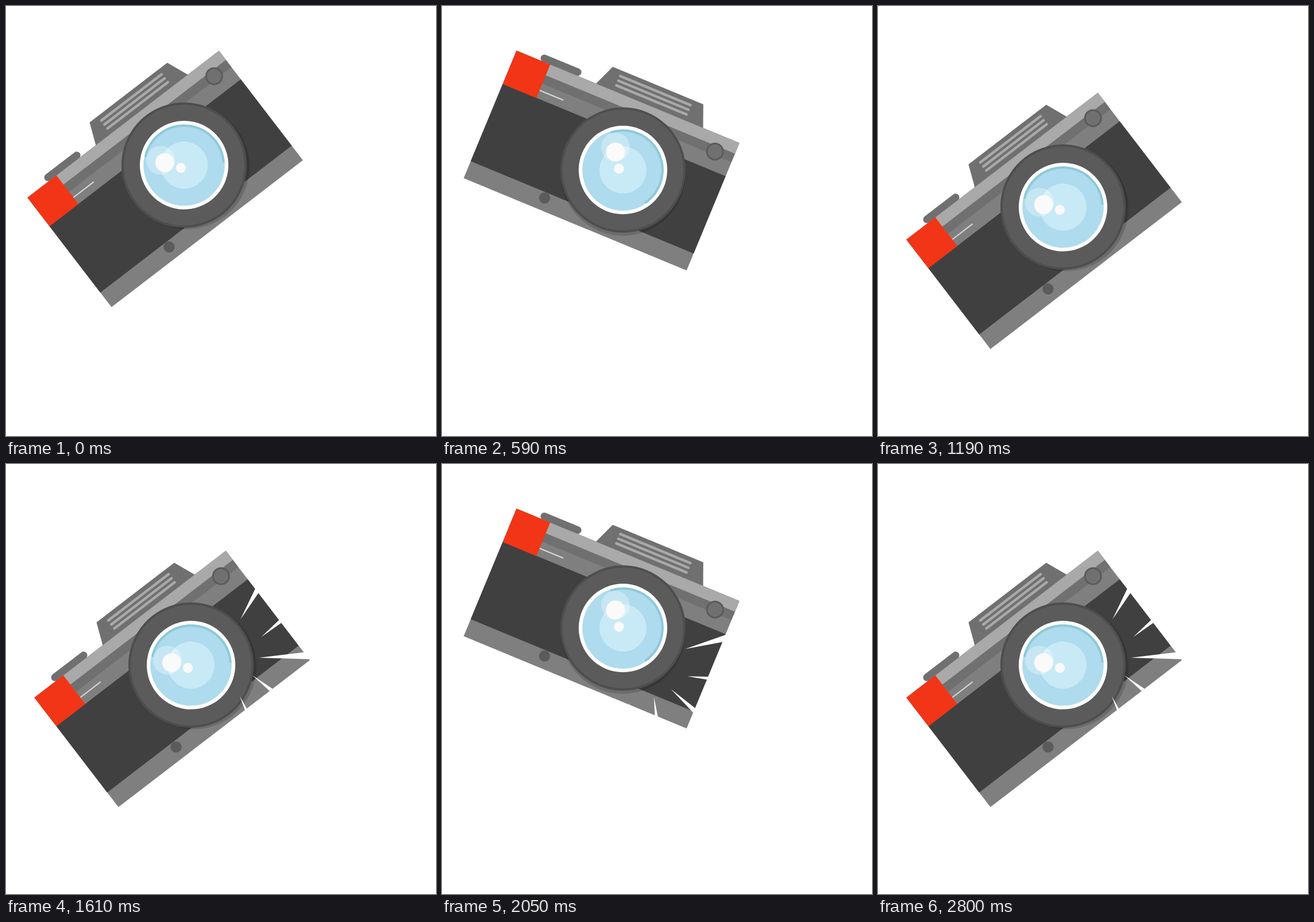
Animation, 748 px wide and 748 px high, one loop 2970 ms. Source, as an HTML page:

```html
<!DOCTYPE html>
<html lang="en">
<head>
<meta charset="utf-8">
<title>Cracking camera</title>
<style>
html, body { margin: 0; width: 100%; height: 100%; overflow: hidden; background: #fff; }
svg { display: block; width: 100%; height: 100%; }
</style>
</head>
<body>
<svg viewBox="0 0 748 748">
  <g id="stage">
    <g id="camera">
      <g stroke-linecap="round" fill="none">
        <path d="M49 -6.3H112" stroke="#707070" stroke-width="13"/>
        <path d="M148.7 1L164.7 -38.2H335.2L351.2 1Z" fill="#707070"/>
        <path d="M183 -28.3H315M183 -19.5H315M183 -10.8H315" stroke="#a9a9a9" stroke-width="4.5"/>
      </g>
      <path d="M-.7 0H419V240H-.7Z" fill="#7f7f7f"/>
      <path d="M-.7 0H419V36H-.7Z" fill="#707070"/>
      <path d="M-.7 0H419V20H-.7Z" fill="#a9a9a9"/>
      <path d="M-.7 62.5H419V208H-.7Z" fill="#404040"/>
      <path d="M-.7 -.3H62.7V62.7H-.7Z" fill="#f23516"/>
      <path d="M63 48.3H107.5" stroke="#d9d9d9" stroke-width="2"/>
      <circle cx="385.5" cy="30" r="14" fill="#707070" stroke="#5b5b5b" stroke-width="3"/>
      <circle cx="142.5" cy="218" r="9.7" fill="#5b5b5b"/>
      <g transform="translate(249.9 120.9)">
        <circle cx="2.2" cy="4.9" r="109" opacity=".16"/>
        <circle r="107" fill="#5b5b5b" stroke="#4e4e4e" stroke-width="4"/>
        <circle r="77" fill="#fff"/>
        <circle r="70.7" fill="#aedbed"/>
        <path d="M-44.7 -52.3A68.8 68.8 0 0 1 57.2 38.2" fill="none" stroke="#8ccad9" stroke-width="4"/>
        <circle r="41" fill="#c8eaf6"/>
        <circle cx="-27.4" cy="-31.8" r="25" fill="#fff" opacity=".3"/>
        <circle cx="-24.1" cy="-24" r="16.5" fill="#fafafa"/>
        <circle cx="-7.4" cy=".5" r="8.7" fill="#fafafa"/>
      </g>
    </g>
    <path id="burst" fill="#fff"/>
  </g>
</svg>
<script>
const $ = id => document.getElementById(id);
const move = (id, transform) => $(id).setAttribute('transform', transform);

// One burst of cracks serves both poses: tip x, tip y, heading, length.
const cracks = [
  [-32, -67, -60, 76],
  [4, -36, -39.5, 48],
  [0, 0, -2.6, 95],
  [-11.5, 30.5, 38, 47],
  [-33.5, 66.5, 65, 30]
];
const TAPER = 0.15;

// A crack scales up from its open end, keeping its taper.
function crackPath([x, y, heading, length], grow) {
  const a = heading * Math.PI / 180, cos = Math.cos(a), sin = Math.sin(a);
  const at = (along, across) => `${x + along * cos - across * sin} ${y + along * sin + across * cos}`;
  const half = length * grow * TAPER / 2;
  return `M${at(length * (1 - grow), 0)}L${at(length, half)}L${at(length, -half)}Z`;
}

const LOOP = 2970, CYCLE = 1190, TURN = 590, STEP = 30;

function draw(now) {
  const t = now % LOOP, phase = t % CYCLE;
  const up = phase < TURN;
  const sinceHit = phase - (up ? 300 : 860);
  const steps = up ? 5 : 1;
  const grow = sinceHit < 0 ? 0 : Math.min(1, (Math.floor(sinceHit / STEP) + 1) / steps);

  // Only the first upward pose sits higher; later ones land lower.
  move('stage', up && t >= CYCLE ? 'translate(12 73)' : '');
  move('camera', up ? 'translate(38 333) rotate(-37.5)' : 'translate(130.2 78) rotate(22.5)');
  move('burst', up ? 'translate(428 264)' : 'translate(398.4 391.8) rotate(45)');
  $('burst').setAttribute('d', grow ? cracks.map(c => crackPath(c, grow)).join('') : '');
}

let begin;
function frame(now) {
  begin ??= now;
  draw(now - begin);
  requestAnimationFrame(frame);
}
draw(0);
requestAnimationFrame(frame);
</script>
</body>
</html>
```
